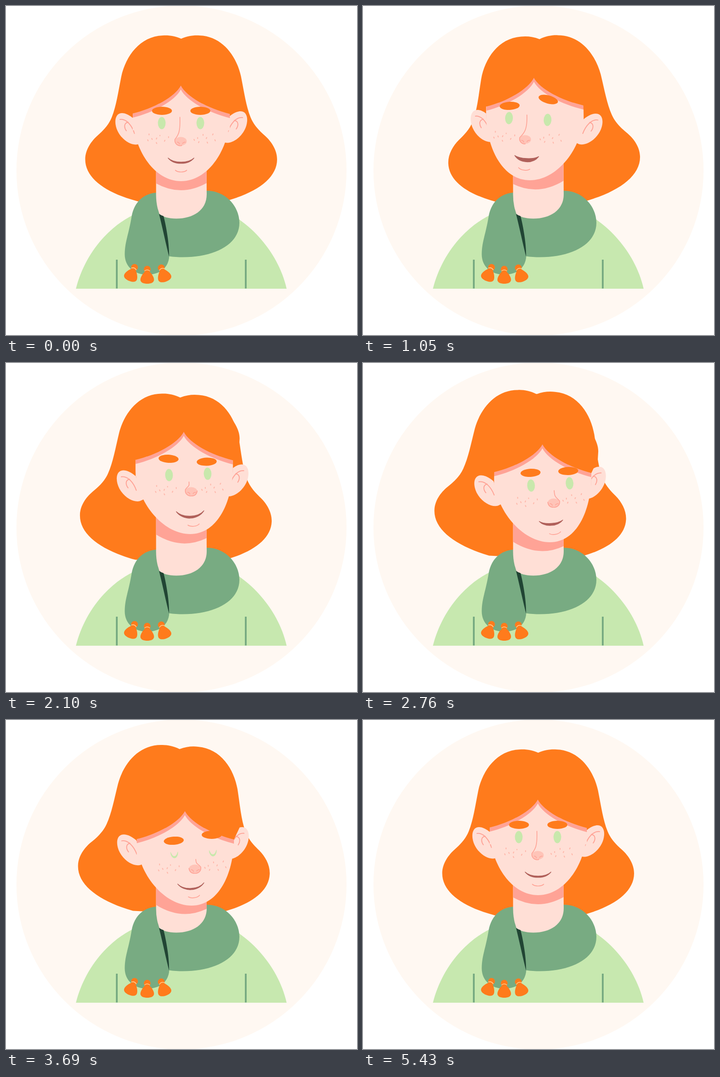
Animation, 773 px wide and 725 px high, one loop 5520 ms. Source, as an HTML page:

```html
<!DOCTYPE html>
<html lang="en">
<head>
<meta charset="utf-8">
<title>Portrait</title>
<style>
html, body { margin: 0; width: 100%; height: 100%; overflow: hidden; background: #fff; }
svg { display: block; width: 773px; height: 725px; }
.hair { fill: #ff7b1c; }
.skin { fill: #ffdfd6; }
.pink { fill: #ffa396; }
.scarf { fill: #78ab82; }
.knit { fill: #c7e8af; }
.line { fill: none; stroke: #ffa396; stroke-width: 2; stroke-linecap: round; stroke-linejoin: round; }
</style>
</head>
<body>
<svg viewBox="0 0 773 725">
  <defs>
    <path id="half" d="M387 72H385.5C372 66 358 64 345 65C295 67 264 110 254 155C247 190 243 220 233 245C225 265 210 278 200 287C186 300 174.500 318 174.500 338C174.500 382 225 415 300 433H387Z"/>
    <g id="ear">
      <path class="skin" d="M283 250C270 238 258 234 250 237C238 242 239 262 246 276C256 296 276 308 290 305L302 300Z"/>
      <path class="line" d="M251 250C266 248 278 265 283 281M265 275C260 268 259 258 269 256"/>
    </g>
    <path id="brow" d="M279 237C325 226 372 200 385 175C398 200 445 226 493 238V265H279Z"/>
    <g id="tassel">
      <circle class="hair" r="7.5"/>
      <path class="hair" d="M-5 5C-9 9 -15 17 -15 23C-15 30 -7 32 0 32S15 30 15 23C15 17 9 9 5 5Z"/>
      <path d="M-6 4Q0 -1 6 4" fill="none" stroke="#ffd08f" stroke-width="1.6"/>
    </g>
    <path id="throat" d="M330.500 340H441.500L442 415C442 450 412 468.500 375 468.500C357 468.500 345 464 338 459L334 446Q330.500 432 330.500 415Z"/>
    <path id="lid" d="M-11 -16H11V-1H9C6 0 6 9 0 9S-6 0 -9 -1H-11Z"/>
    <clipPath id="neckClip"><use href="#throat"/></clipPath>
    <clipPath id="eyeClip">
      <ellipse cx="343" cy="258" rx="10" ry="15"/><ellipse cx="428" cy="258" rx="10" ry="15"/>
    </clipPath>
  </defs>

  <circle cx="386.5" cy="362.5" r="363.5" fill="#fff8f2"/>
  <g id="hair" class="hair">
    <use href="#half"/><use href="#half" transform="matrix(-1 0 0 1 771.500 0)"/>
  </g>

  <path class="knit" d="M154 623C172 550 224 484 290 456H490C550 488 602 552 618 623Z"/>
  <path d="M244 559V622.500M528 559V622.500" stroke="#78ab82" stroke-width="4"/>
  <path class="scarf" d="M335 411C303 412 283 432 277 462C270 505 262 518 261.500 546C261 575 283 592 311 592C340 592 358 576 359.500 551.500C369 553 379 553.500 390 553.500C460 553.500 514 525 514 478C514 440 482 406 440 407H400V430H335Z"/>
  <use href="#throat" class="skin"/>
  <g clip-path="url(#neckClip)">
    <path id="shade" class="pink" d="M270 330V350L310.500 378Q385.500 434 460.500 378L500 350V330Z"/>
  </g>
  <path fill="#214534" d="M337 458C345 490 351 520 359 552C360 530 354 490 347 463Q342 462 337 458Z"/>
  <use href="#tassel" transform="translate(283 576) rotate(22)"/>
  <use href="#tassel" transform="translate(311 580)"/>
  <use href="#tassel" transform="translate(342 577) rotate(-19)"/>

  <g id="ears">
    <use href="#ear"/><use href="#ear" transform="matrix(-1 0 0 1 772 -4)"/>
  </g>
  <path id="face" class="skin"/>
  <g id="fringe">
    <use href="#brow" class="pink"/>
    <use href="#brow" class="skin" y="9"/>
    <path class="hair" d="M279 237C325 226 372 200 385 175C398 200 445 226 493 238L507 208L508 190C508 175 500 160 493 150L386 130L290 150C280 160 270 175 270 190L266 208Z"/>
  </g>

  <g id="eyes">
    <g fill="#c8e8ac"><ellipse cx="343" cy="258" rx="8.5" ry="13.5"/><ellipse cx="428" cy="258" rx="8.5" ry="13.5"/></g>
    <g clip-path="url(#eyeClip)">
      <g id="lids" class="skin"><use href="#lid" x="343" y="258"/><use href="#lid" x="428" y="258"/></g>
    </g>
  </g>
  <path id="freckles" fill="none" stroke="#ffb9ac" stroke-width="2.2" stroke-linecap="round"
    d="M315 282v2M321 292l1 2M312 295l1 2M332 291l-1 2M339 285v1M331 301l1 2M350 296l-1 2M358 288v2M414 294l1 2M422 290v2M434 283v2M425 299l-1 2M442 290l-1 2M443 300l1 2M456 282l-1 2M460 295l1 2"/>
  <g id="nose">
    <ellipse rx="13" ry="9.5" fill="#ffc4b8"/>
    <path id="bridge" class="line" style="stroke-width:1.7"/>
    <path class="line" style="stroke-width:1.5" d="M-8 2q4 0 5 4M4 5q1 -3 6 -3"/>
  </g>
  <path id="mouth" fill="#b0605a" stroke="#b0605a" stroke-width="1.3" stroke-linejoin="round"/>
  <path id="chin" class="line" style="stroke-width:1.7" d="M-12.500 0C-7 5 7 5 12.500 0"/>
  <ellipse id="browL" class="hair" rx="22" ry="9"/>
  <ellipse id="browR" class="hair" rx="22" ry="9"/>
</svg>
<script>
const LOOP = 5520;
// Key times and the pose held at each: 0 rest, 1 look left, 2 look up, 3 turn, 4 nod, 5 return.
const TIMES = [0, 600, 1320, 2100, 2760, 3300, 3850, 4410, 5000, LOOP];
const ORDER = [0, 1, 1, 2, 3, 4, 4, 5, 0, 0];

// Each track lists the values of poses 1 to 5; `rest` is pose 0.
const track = (list, rest = 0) => {
  const v = ORDER.map(p => p ? list[p - 1] : rest);
  const slope = v.map((_, i) => ORDER[i] === 2 || ORDER[i] === 3 || ORDER[i] === 5
    ? 1.57 * (v[i + 1] - v[i - 1]) / (TIMES[i + 1] - TIMES[i - 1]) : 0);
  return t => {
    let i = 0;
    while (t >= TIMES[i + 1]) i++;
    const h = TIMES[i + 1] - TIMES[i], u = (t - TIMES[i]) / h, w = 1 - u;
    return v[i] + (v[i + 1] - v[i]) * u * u * (3 - 2 * u)
      + h * u * w * (w * slope[i] - u * slope[i + 1]);
  };
};

const tracks = {
  tilt: track([2.7, -2, -3.3, -2.7, -2]),
  hairX: track([3, -2, -3.5, -3.5, -1.5]),
  hairY: track([1, 4, -3.5, -8, -4]),
  hairR: track([-2.2, 2.1, 3, 2.7, 1.5]),
  earX: track([-4.5, 3.5, 5, 4.5, 2]),
  earY: track([-1, -4, 4, 10, 4.5]),
  fringeX: track([-8, 6.5, 10, 9, 4.5]),
  fringeY: track([-17, -23.5, 4, 25.5, 12.5]),
  fringeR: track([-1, 0, .3, 0, 0]),
  jawX: track([-18, 20, 26, 23, 14]),
  jawY: track([-2, -9, 9, 23, 12]),
  eyeX: track([-21.5, 16, 27, 27.5, 15]),
  eyeY: track([-9, -12.5, 9.5, 31, 17]),
  lid: track([-25, -25, -25, 0, -2], -25),
  freckleX: track([-24, 17, 26, 23.5, 12]),
  freckleY: track([-2.5, -14.5, 10, 32, 15]),
  noseX: track([-28, 23, 35, 31, 16]),
  noseY: track([-4, -15, 10, 30, 15]),
  bridgeX: track([4, -5, 1, 2, -4], -2),
  bridgeY: track([-54, -21, -27, -21, -33], -53),
  side: track([-12, -13, 13, 13, -13], -13),
  end: track([0, 13, -13, -13, 13], 2),
  mouthX: track([-25, 20, 28.5, 21.5, 13.5]),
  mouthY: track([-4.5, -8.5, 12.5, 25, 13]),
  mouthW: track([26.5, 30.5, 26, 29, 31], 28.5),
  lower: track([13, 15.5, 10.5, 14, 14], 12),
  upper: track([5.5, 11, 6, 11, 11], 9),
  chinX: track([-30.5, 27.5, 37.5, 28.5, 18]),
  chinY: track([-4, -6, 12, 26, 16.5]),
  browLX: track([-20.5, 14.5, 25.5, 26, 14]),
  browLY: track([-11, -20, 11, 35, 19]),
  browLR: track([-3, 3, -3, -4, -2]),
  browRX: track([-20, 14, 24, 25, 13]),
  browRY: track([-25, -13.5, 7, 22, 12]),
  browRR: track([15, -2, -2, 0, 0])
};

const el = id => document.getElementById(id);
const move = (id, x, y, r = 0, px = 0, py = 0) =>
  el(id).setAttribute('transform', `translate(${x} ${y}) rotate(${r} ${px} ${py})`);

function draw(t) {
  const p = {};
  for (const k in tracks) p[k] = tracks[k](t);

  move('hair', p.hairX, p.hairY, p.hairR, 385.5, 72);
  move('shade', p.jawX * .5, p.jawY * .93, p.tilt * .6, 385.5, 400);
  move('ears', p.earX, p.earY, p.tilt, 386, 270);
  move('fringe', p.fringeX, p.fringeY, p.fringeR, 386, 215);

  // The chin swings further than the temples.
  const swing = p.jawX - p.fringeX;
  move('face', p.fringeX, p.jawY);
  el('face').setAttribute('d', `M279 215V245C281 315 ${325 + swing} 386 ${385.5 + swing} 386` +
    'S491 315 493 245V215Z');

  move('eyes', p.eyeX, p.eyeY, p.tilt, 385.5, 258);
  move('lids', 0, p.lid);
  move('freckles', p.freckleX, p.freckleY, p.tilt, 386, 292);
  move('browL', 343.5 + p.browLX, 231 + p.browLY, p.browLR);
  move('browR', 428 + p.browRX, 231 + p.browRY, p.browRR);

  const { bridgeX: bx, bridgeY: by, side: s, end: e, mouthW: w } = p;
  move('nose', 385 + p.noseX, 298 + p.noseY);
  el('bridge').setAttribute('d',
    `M${bx} ${by}C${bx + 1} ${by * .4} ${bx * .5 + s * .3} -14 ${s} -4` +
    `C${s * 1.1} 5 ${s * .6} 10 0 10Q${e * .9} 10 ${e} ${9 - .06 * e * e}`);

  move('mouth', 385.5 + p.mouthX, 335 + p.mouthY, p.tilt);
  const lip = (from, depth) => `C${from * .55} ${depth * 1.33} ${-from * .55} ${depth * 1.33} ${-from} 0`;
  el('mouth').setAttribute('d', `M${-w} 0${lip(-w, p.lower)}${lip(w, p.upper)}Z`);
  move('chin', 385.5 + p.chinX, 362 + p.chinY, p.tilt * 3);
}

function frame(now) {
  draw(Math.floor(now % LOOP / 30) * 30);
  requestAnimationFrame(frame);
}
draw(0);
requestAnimationFrame(frame);
</script>
</body>
</html>
```
